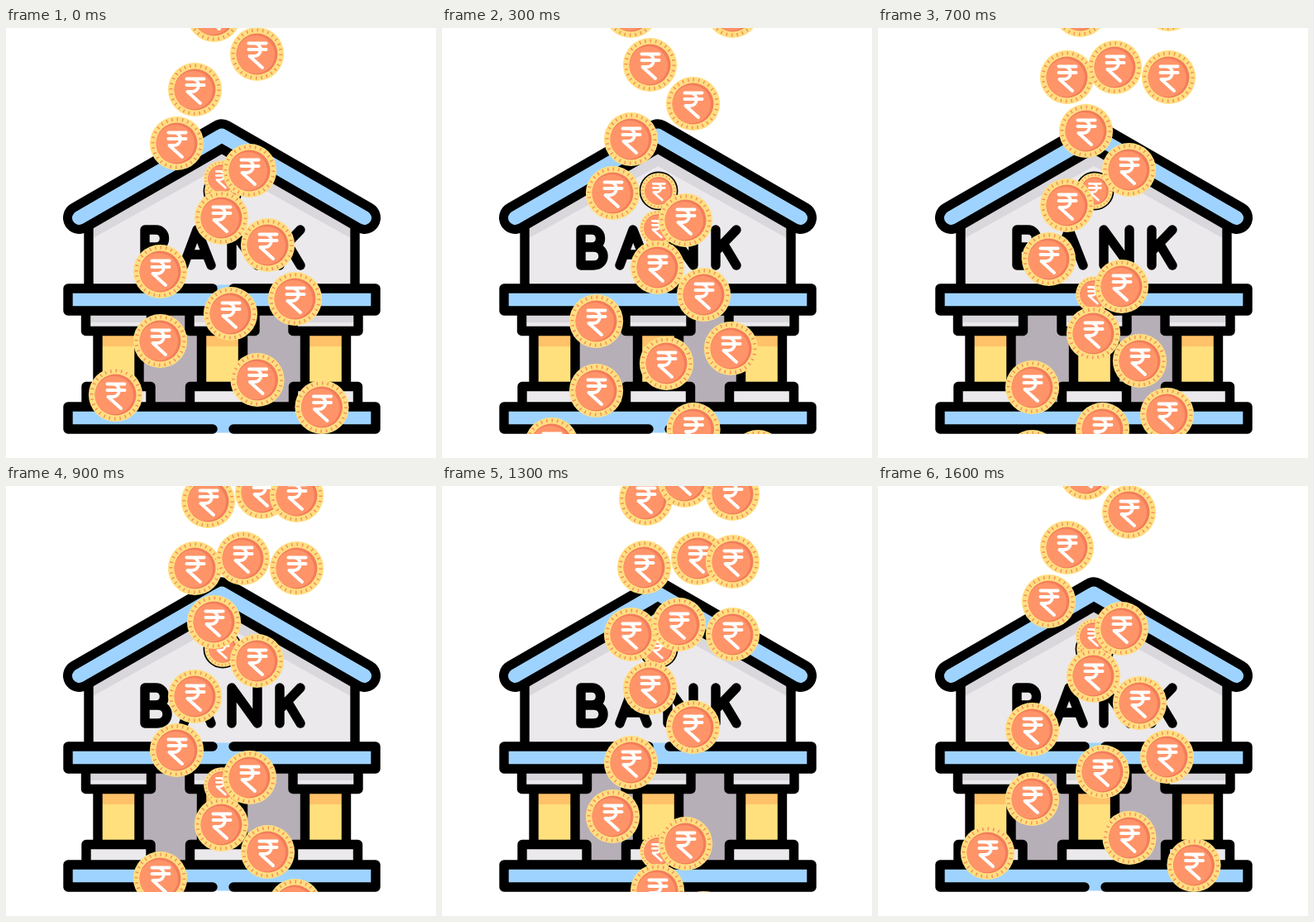
Animation of 520x520 px, one loop 1.7 s. Source, as an HTML page without scripts:

```html
<!DOCTYPE html>
<html lang="en">
<head>
<meta charset="utf-8">
<title>Coins falling over a bank</title>
<style>
  html, body { margin: 0; width: 100%; height: 100%; overflow: hidden; background: #fff; }
  svg { display: block; width: 520px; height: 520px; }
  .line { fill: none; stroke: #000; stroke-width: 11.4; stroke-linecap: round; stroke-linejoin: round; }
  .roof { fill: none; stroke-linecap: round; stroke-linejoin: round; }
  .blue { fill: #9fd3ff; }
  .wall { fill: #ebe9ec; }
  .wall-shade { fill: #d9d7db; }

  /* Sixteen 20px steps, then one held frame at the start position. */
  .rain { animation: fall 1700ms infinite; }
  @keyframes fall {
    0% { transform: translateY(0); animation-timing-function: steps(16, end); }
    94.11% { transform: translateY(320px); animation-timing-function: step-start; }
    94.115%, 100% { transform: translateY(0); }
  }
</style>
</head>
<body>
<svg viewBox="0 0 520 520" role="img" aria-label="Bank with falling rupee coins">
  <defs>
    <clipPath id="stage"><rect width="520" height="490.5"/></clipPath>

    <g id="coin">
      <circle r="32.6" fill="#ffdf80"/>
      <circle r="29" fill="none" stroke="#f6935f" stroke-width="4" pathLength="28" stroke-dasharray=".25 .75"/>
      <circle r="25" fill="#f27d5b"/>
      <circle cx="-1.7" cy=".6" r="23.2" fill="#ff9469"/>
      <path d="M-10-13H11M-10-5.5H11M-10-13H-4C7-13 7 2.500-4 2.500H-9L6.500 16.500"
            fill="none" stroke="#fff" stroke-width="4" stroke-linecap="round" stroke-linejoin="round"/>
    </g>
    <g id="small-coin"><use href="#coin" transform="scale(.67)"/></g>

    <g id="column">
      <path fill="#ffe07d" d="M-25 367h50v66h-50z"/>
      <path fill="#ffc269" d="M-25 367h50v18h-50z"/>
      <path class="wall" d="M-39 345h78v22h-78zM-39 433h78v25h-78z"/>
      <path class="wall-shade" d="M-39 345h78v11h-78z"/>
      <path class="line" d="M-39.500 345V366.500H39.500V345M-25 367V433M25 367V433M-39 456V433.500H39V456"/>
    </g>

    <g id="beam">
      <rect class="blue" x="75" y="310.500" width="372" height="31"/>
      <path class="line" d="M250 315H75V342H447V315H275"/>
    </g>
  </defs>

  <g id="bank">
    <path class="wall" d="M100 231L261 140L422 231V315H100z"/>
    <path class="wall-shade" d="M100 231L261 140L422 231V257L261 167L100 257z"/>
    <path class="line" d="M100 235V315M422 235V315"/>
    <path class="roof" d="M88.500 229.500L261 130L433.500 229.500" stroke="#000" stroke-width="39"/>
    <path class="roof" d="M88.500 229.500L261 130L433.500 229.500" stroke="#9fd3ff" stroke-width="17"/>

    <g class="line" aria-label="BANK">
      <path d="M168 244V287H183C199 287 199 265 183 265H168M168 244H181C195 244 195 265 181 265"/>
      <path d="M215 287L231 244L248 287M221 274H242"/>
      <path d="M273 287V244L304 287V244"/>
      <path d="M331 244V287M356 244L333 268M341 262L356 287"/>
    </g>

    <rect x="160" y="345" width="202" height="110" fill="#b7afb7"/>
    <use href="#column" x="136"/>
    <use href="#column" x="261.500"/>
    <use href="#column" x="386.500"/>
    <use href="#beam"/>
    <use href="#beam" transform="matrix(1 0 0 -1 0 800)"/>

    <circle cx="262" cy="197" r="23.500"/>
    <use href="#small-coin" x="262" y="197"/>
  </g>

  <g clip-path="url(#stage)">
    <g class="rain">
      <use href="#small-coin" x="261" y="182"/>
      <use href="#coin" x="382" y="458.500"/>
      <use href="#coin" x="132.500" y="443.500"/>
      <use href="#coin" x="304" y="425.500"/>
      <use href="#coin" x="186.500" y="378.500"/>
      <use href="#coin" x="271.500" y="345.500"/>
      <use href="#coin" x="349.500" y="327.500"/>
      <use href="#coin" x="186.500" y="294.500"/>
      <use href="#coin" x="260.500" y="229.500"/>
      <use href="#coin" x="316.500" y="262.500"/>
      <use href="#coin" x="294.500" y="172.500"/>
      <use href="#coin" x="206.500" y="139.500"/>
      <use href="#coin" x="228.500" y="74.500"/>
      <use href="#coin" x="303.500" y="31.500"/>
      <use href="#coin" x="251.500" y="-15.500"/>
      <use href="#coin" x="228.500" y="-80.500"/>
      <use href="#coin" x="286.500" y="-92.500"/>
      <use href="#coin" x="351.500" y="-80.500"/>
      <use href="#coin" x="244.500" y="-161.500"/>
      <use href="#coin" x="309.500" y="-172.500"/>
      <use href="#coin" x="351.500" y="-168.500"/>
      <use href="#coin" x="246.500" y="-244.500"/>
      <use href="#coin" x="293.500" y="-266.500"/>
      <use href="#coin" x="351.500" y="-250.500"/>
    </g>
  </g>
</svg>
</body>
</html>
```
